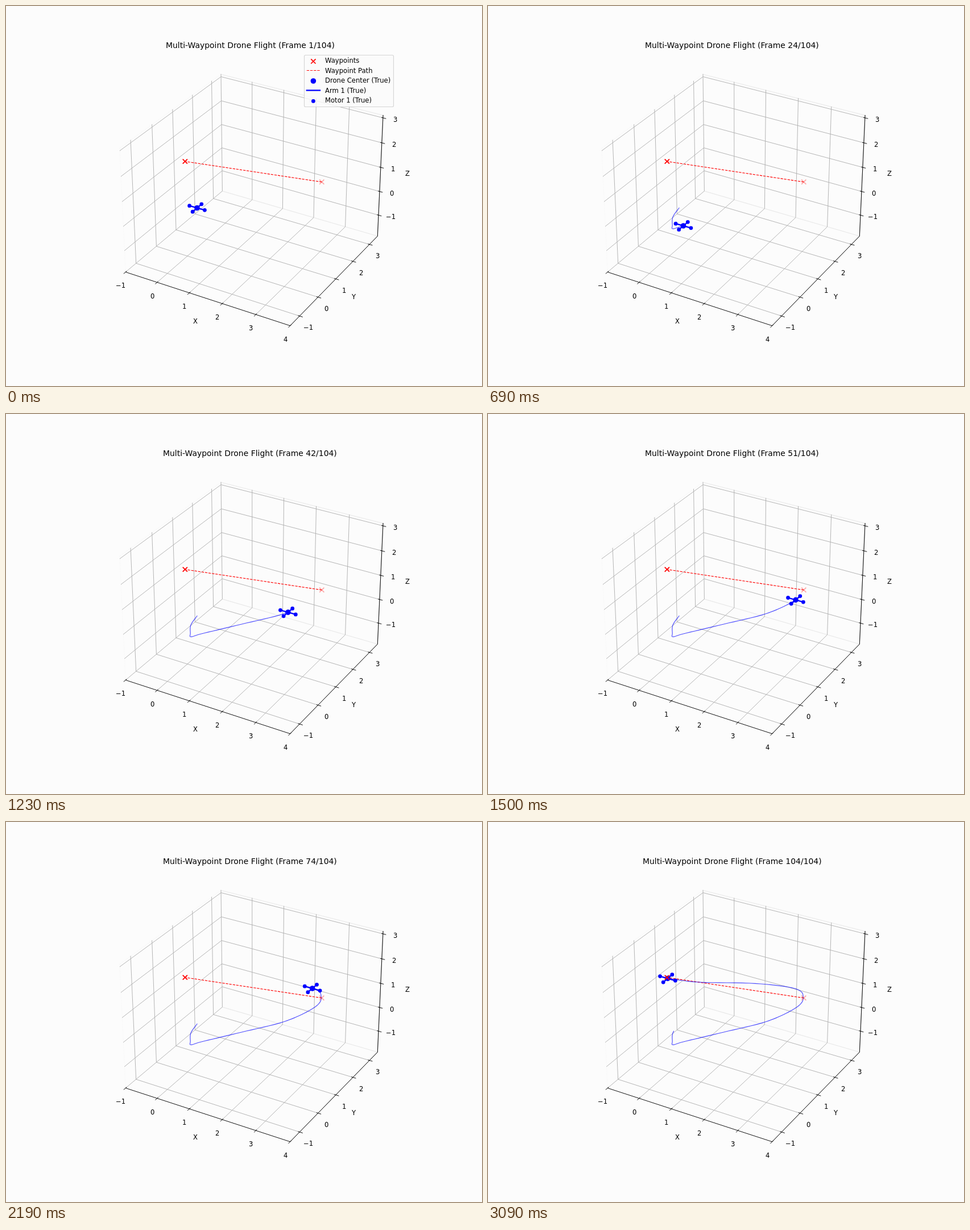
Write an HTML page with a canvas that moves like this. It is 837 px wide and 669 px high and loops after 3120 ms.

```html
<!DOCTYPE html>
<html lang="en">
<head>
<meta charset="utf-8">
<title>Drone flight</title>
<style>
html, body { margin: 0; width: 100%; height: 100%; overflow: hidden; background: #fcfcfc; }
canvas { display: block; }
</style>
</head>
<body>
<canvas id="stage" width="837" height="669"></canvas>
<script>
const ctx = document.getElementById('stage').getContext('2d');
const PT = 1.1625; // pixels per point
const STEP = 30, COUNT = 104, TRAIL = 100;
const X = [-1, 4], Y = [-1.5, 3.5], Z = [-1.9, 3.1];
const BLUE = '#0000ff', RED = '#ff0000', GRID = '#b0b0b0';
const CENTER_R = 4.8, MOTOR_R = 3.4;

// Perspective camera: elevation 30, azimuth -60, distance 10
function project([x, y, z]) {
  const c30 = Math.sqrt(3) / 2;
  const a = ((x - X[0]) / 5 - 0.5) * 1.1905;
  const b = ((y - Y[0]) / 5 - 0.5) * 1.1905;
  const c = ((z - Z[0]) / 5 - 0.5) * 0.8929;
  const k = 2784 / (10 - (c30 / 2 * a - 0.75 * b + 0.5 * c));
  return [435.9 + k * (c30 * a + 0.5 * b), 330.9 - k * (-0.25 * a + c30 / 2 * b + c30 * c)];
}

const far = project([3, 2, 1]), near = project([0, 0, 2]);

// Flight: a smooth curve through a few points (step, x, y)
const KEYS = [
  [0, 336, 355.5], [5, 325, 371.5], [10, 324.2, 386], [16, 325, 392.2], [23, 343.5, 387],
  [32, 413.5, 370.2], [40, 489, 351.5], [50, 541, 327.3], [60, 554.2, 309.5],
  [73, 538.7, 293], [82, 470, 284.3], [90, 374.5, 282.2], [103, 316, 275.4]
];

function slope(i, axis) {
  const a = KEYS[Math.max(i - 1, 0)], b = KEYS[Math.min(i + 1, KEYS.length - 1)];
  return (b[axis] - a[axis]) / (b[0] - a[0]);
}

function position(step) {
  const i = Math.max(0, KEYS.findIndex(key => key[0] >= step) - 1);
  const a = KEYS[i], b = KEYS[i + 1], h = b[0] - a[0], t = (step - a[0]) / h;
  const s = t * t * (3 - 2 * t);
  return [1, 2].map(n => a[n] + (b[n] - a[n]) * s +
    h * t * (1 - t) * ((1 - t) * slope(i, n) - t * slope(i + 1, n)));
}

const path = Array.from({ length: COUNT }, (_, step) => position(step));

function line(points, color, width = 0.8, dash = []) {
  ctx.strokeStyle = color;
  ctx.lineWidth = width * PT;
  ctx.lineCap = dash.length ? 'butt' : 'square';
  ctx.lineJoin = 'round';
  ctx.setLineDash(dash);
  ctx.beginPath();
  for (const p of points) ctx.lineTo(...p);
  ctx.stroke();
}

const line3d = (points, color, width) => line(points.map(project), color, width);
const dashed = points => line(points, RED, 1, [3.7 * PT, 1.6 * PT]);

function dot([x, y], r) {
  ctx.fillStyle = BLUE;
  ctx.beginPath();
  ctx.arc(x, y, r, 0, 7);
  ctx.fill();
}

function cross([x, y], color = RED) {
  const r = 4.1;
  ctx.strokeStyle = color;
  ctx.lineWidth = 1.5 * PT;
  ctx.lineCap = 'butt';
  ctx.setLineDash([]);
  ctx.beginPath();
  for (const s of [-r, r]) {
    ctx.moveTo(x - r, y - s);
    ctx.lineTo(x + r, y + s);
  }
  ctx.stroke();
}

function text(str, x, y, points = 10, anchor = 0.5) {
  ctx.font = `${points * PT}px "DejaVu Sans", sans-serif`;
  ctx.fillStyle = '#000';
  ctx.fillText(str, Math.round(x - ctx.measureText(str).width * anchor), Math.round(y));
}

function tick(value, at, dir, dx, dy) {
  const along = d => at.map((v, i) => v + dir[i] * d);
  line3d([along(-0.042), along(0.083)], '#000');
  const [x, y] = project(at);
  text(String(value).replace('-', '\u2212'), x + dx, y + dy);
}

function drawAxes() {
  const [x0, x1] = X, [y0, y1] = Y, [z0, z1] = Z;
  line3d([[x0, y0, z0], [x0, y0, z1], [x0, y1, z1]], '#f9f9f9', 1);
  line3d([[x0, y1, z1], [x1, y1, z1]], '#ebebeb', 1);
  line3d([[x0, y1, z0], [x1, y1, z0]], '#e8e8e8', 1);

  for (let x = -1; x <= 4; x++) line3d([[x, y0, z0], [x, y1, z0], [x, y1, z1]], GRID);
  for (let y = -1; y <= 3; y++) line3d([[x1, y, z0], [x0, y, z0], [x0, y, z1]], GRID);
  for (let z = -1; z <= 3; z++) line3d([[x0, y0, z], [x0, y1, z], [x1, y1, z]], GRID);

  line3d([[x0, y0, z0], [x1, y0, z0], [x1, y1, z0], [x1, y1, z1]], '#000');
  for (let x = -1; x <= 4; x++) tick(x, [x, y0, z0], [0, -1, 0], -8.3, 28);
  for (let v = -1; v <= 3; v++) {
    tick(v, [x1, v, z0], [1, 0, 0], 14.8, 24.4);
    tick(v, [x1, y1, v], [1, 0, 0], 22, 7);
  }
  text('X', 333, 559);
  text('Y', 612, 516);
  text('Z', 706, 299);
}

function drawLegend() {
  ctx.beginPath();
  ctx.roundRect(524.5, 86.5, 157, 91, 2.3);
  ctx.fillStyle = 'rgba(252,252,252,.8)';
  ctx.fill();
  ctx.strokeStyle = 'rgba(204,204,204,.8)';
  ctx.lineWidth = PT;
  ctx.setLineDash([]);
  ctx.stroke();
  ['Waypoints', 'Waypoint Path', 'Drone Center (True)', 'Arm 1 (True)', 'Motor 1 (True)']
    .forEach((label, i) => text(label, 561.2, 100.2 + 17.5 * i, 10, 0));
  const left = 528.8, right = 552, mid = (left + right) / 2;
  cross([mid, 97.4]);
  dashed([[left, 113.5], [right, 113.5]]);
  dot([mid, 132], CENTER_R);
  line([[left, 148.5], [right, 148.5]], BLUE, 2);
  dot([mid, 167.4], MOTOR_R);
}

function drawDrone(step) {
  const [x, y] = path[step];
  const arms = [[13.4, 3.8], [7.8, -6.7]]
    .map(([dx, dy]) => [[x - dx, y - dy], [x + dx, y + dy]]);
  line(path.slice(Math.max(0, step + 1 - TRAIL), step + 1), 'rgba(0,0,255,.7)', 1);
  for (const arm of arms) line(arm, BLUE, 2);
  dot([x, y], CENTER_R);
  for (const motor of arms.flat()) dot(motor, MOTOR_R);
}

function draw() {
  const step = Math.floor(performance.now() / STEP) % COUNT;
  ctx.fillStyle = '#fcfcfc';
  ctx.fillRect(0, 0, 837, 669);
  drawAxes();
  text(`Multi-Waypoint Drone Flight (Frame ${step + 1}/${COUNT})`, 429, 73.6, 12);
  dashed([far, near]);
  drawDrone(step);
  cross(far, 'rgba(255,0,0,.33)');
  cross(near);
  if (step === 0) drawLegend();
  requestAnimationFrame(draw);
}
draw();
</script>
</body>
</html>
```
